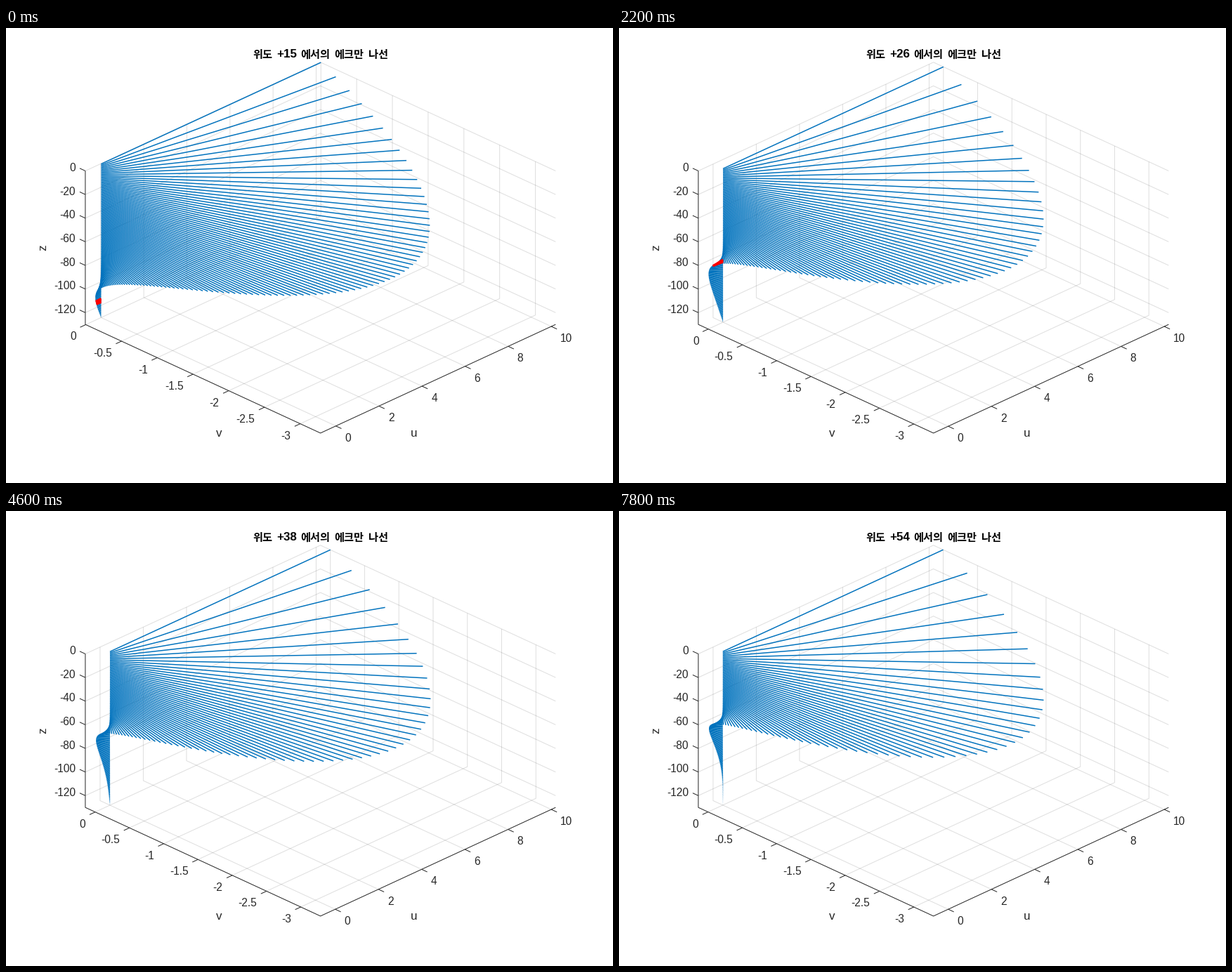
These frames come from a looping animation (864 by 648 pixels, 8000 ms). A matplotlib script:

```python
import numpy as np
import matplotlib.pyplot as plt
from matplotlib.animation import FuncAnimation
from matplotlib.collections import LineCollection

W, H, DPI = 864, 648, 100
LEFT, HALF = 112.9, 334.7            # box corner and half width
TOP, RISE, TALL = 48.8, 154.7, 218.7  # box top, slope height, wall height
INK, BLUE = "#262626", "#0072BD"

DEPTH = 130
EDDY = 0.02          # vertical eddy viscosity
OMEGA = 7.2921e-5
SPEED = 10.2         # surface current
Z = -np.arange(DEPTH + 1.0)

U_TICKS = np.arange(0, 11, 2)
V_TICKS = -0.5 * np.arange(7)
Z_TICKS = -20 * np.arange(7)

plt.rcParams["font.family"] = ["Liberation Sans", "Noto Sans CJK JP"]
fig = plt.figure(figsize=(W / DPI, H / DPI), dpi=DPI, facecolor="white")
ax = fig.add_axes([0, 0, 1, 1])
ax.set_xlim(0, W)
ax.set_ylim(H, 0)
ax.axis("off")


def place(a, b, c):
    """Box fractions (along u, along -v, downwards) to stage pixels."""
    return np.array([LEFT + HALF * (a + b), TOP + RISE * (1 - a + b) + TALL * c])


def lines(color, width, order, **kw):
    group = LineCollection([], colors=color, linewidths=width * 72 / DPI,
                           zorder=order, **kw)
    return ax.add_collection(group)


def label(x, y, text, px=15.5, ha="center", **kw):
    return ax.text(x, y, text, fontsize=px * 72 / DPI, ha=ha, va="baseline",
                   color=kw.pop("color", INK), **kw)


def spiral(lat):
    """Ekman flow over a no-slip bottom, as u + iv."""
    d = np.sqrt(2 * EDDY / (2 * OMEGA * np.sin(np.radians(lat))))
    k = (1 + 1j) / d
    return SPEED * np.sinh(k * (DEPTH + Z)) / np.sinh(k * DEPTH)


def reversal(v):
    """Depth at which the flow opposes the surface current."""
    k = 10 + np.argmax(v[10:] > 0)
    return k - 1 - v[k - 1] / (v[k] - v[k - 1])


grid = lines(INK, 1.0, 1, alpha=0.15)
edges = lines(INK, 1.0, 2)
arrows = lines(BLUE, 1.5, 3)
marks = lines("red", 3.1, 4)

u_labels = [label(0, 0, f"{t:g}", ha="left") for t in U_TICKS]
v_labels = [label(0, 0, f"{t:g}" if t else "0", ha="right") for t in V_TICKS]
for t in Z_TICKS:
    x, y = place(0, 0, -t / DEPTH)
    label(x - 14, y + 0.6, str(t), ha="right")

label(580.5, 581.5, "u", 17)
label(303.5, 581.5, "v", 17)
label(57.5, 313, "z", 17, rotation=90, rotation_mode="anchor")

for x, word in ((365.5, "위도"), (440.5, "에서의"), (488, "에크만"), (530, "나선")):
    label(x, 42.5, word, 15.2, weight="bold", color="black")
number = label(399.5, 42.5, "", 17, weight="bold", color="black")


def draw(i):
    lat = 15 + i
    w = spiral(lat)
    u, v = w.real, w.imag
    u0, u1, v0, v1 = u.min(), u.max(), v.min(), v.max()

    def fu(x):
        return (x - u0) / (u1 - u0)

    def fv(y):
        return (v1 - y) / (v1 - v0)

    c = -Z / DEPTH
    root = place(fu(0 * u), fv(0 * v), c).T
    tip = place(fu(u), fv(v), c).T
    segs = np.stack([root, tip], axis=1)
    arrows.set_segments(segs)

    red = np.abs(-Z - reversal(v)) <= 1.6
    marks.set_segments(segs[red] if lat < 34 else [])

    mesh = []
    frame = [[place(0, 0, 0), place(0, 0, 1), place(0, 1, 1), place(1, 1, 1)]]
    out = np.array([8.0, 3.7])
    for t, text in zip(U_TICKS, u_labels):
        a = fu(t)
        mesh.append([place(a, 0, 0), place(a, 0, 1), place(a, 1, 1)])
        p = place(a, 1, 1)
        frame.append([p, p + out])
        text.set_position(p + (13, 22))
    for t, text in zip(V_TICKS, v_labels):
        b = fv(t)
        mesh.append([place(1, b, 0), place(1, b, 1), place(0, b, 1)])
        p = place(0, b, 1)
        frame.append([p, p + out * (-1, 1)])
        text.set_position(p + (-13.5, 22))
    for t in Z_TICKS:
        h = -t / DEPTH
        mesh.append([place(0, 0, h), place(1, 0, h), place(1, 1, h)])
        p = place(0, 0, h)
        frame.append([p, p - out])
    grid.set_segments(mesh)
    edges.set_segments(frame)
    number.set_text(f"+{lat}")
    return [grid, edges, arrows, marks, number, *u_labels, *v_labels]


anim = FuncAnimation(fig, draw, frames=40, interval=200, repeat=True,
                     repeat_delay=0, blit=False)
plt.show()
```
